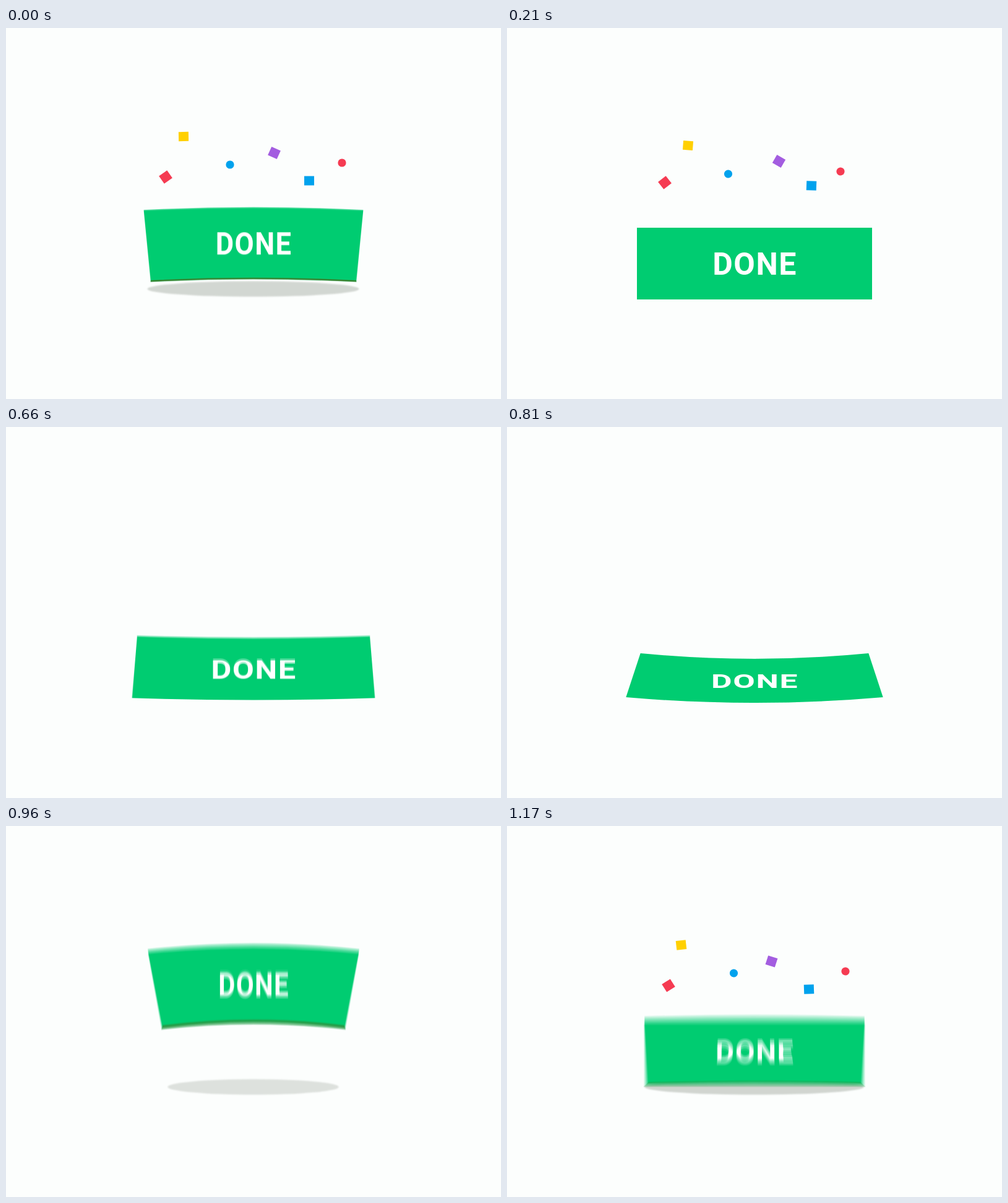
Animation, 800 px wide and 600 px high, one loop 1200 ms. Source, as an HTML page:

```html
<!DOCTYPE html>
<html lang="en">
<head>
<meta charset="utf-8">
<title>Done button</title>
<style>
  html, body { margin: 0; width: 100%; height: 100%; overflow: hidden; background: #fcfefd; }
  svg { display: block; width: 100vw; height: 100vh; }
  text { font: 700 50px Roboto, sans-serif; letter-spacing: 1.6px; text-anchor: middle; }
  .smear { isolation: isolate; }
  .smear > * { mix-blend-mode: plus-lighter; }
</style>
</head>
<body>
<svg id="stage" viewBox="0 0 800 600">
  <ellipse id="shadow" cx="399.5" cy="422" ry="12.5" fill="#20301a" style="filter: blur(1px)"/>
</svg>
<script>
const LOOP = 1200, STEP = 30, SHUTTER = 15, COPIES = 15;
const FLOOR = 439, WIDTH = 380, HEIGHT = 116;
const stage = document.getElementById('stage');
const shadow = document.getElementById('shadow');

// apex time, peak lift, half of the air time
const HOPS = [[985, 117, 121], [1206, 29, 65]];

// time and amount of squash; negative is stretch
const SQUASH = [
  [560, 0], [810, 1], [900, 0.4], [975, -0.25],
  [1050, 0.48], [1120, 1], [1170, 0.25], [1200, 0]
];

// shape, colour, x, y, angle, drift, fall
const CONFETTI = [
  ['rect', '#ffd000', 287, 175.5, -1, 5.5, 14.5],
  ['rect', '#f53b52', 258, 241, -35, -3, 9],
  ['circle', '#00a2ed', 362, 221, 0, -4.5, 15],
  ['rect', '#a35de0', 433.5, 202, 24, 6, 13.5],
  ['rect', '#00a2ed', 490, 247, 0, 2, 8],
  ['circle', '#f53b52', 543, 218, 0, -4, 14]
];

function make(parent, tag, attrs) {
  const el = document.createElementNS('http://www.w3.org/2000/svg', tag);
  set(el, attrs);
  parent.appendChild(el);
  return el;
}

function set(el, attrs) {
  for (const k in attrs) el.setAttribute(k, attrs[k]);
}

// smooth curve through [time, value] keys, flat at turning points
function curve(keys, t) {
  const n = keys.length - 1;
  if (t <= keys[0][0]) return keys[0][1];
  if (t >= keys[n][0]) return keys[n][1];
  const rate = j => (keys[j + 1][1] - keys[j][1]) / (keys[j + 1][0] - keys[j][0]);
  const slope = j => {
    if (j === 0 || j === n) return 0;
    const a = rate(j - 1), b = rate(j);
    return a * b <= 0 ? 0 : 2 * a * b / (a + b);
  };
  let i = 0;
  while (t >= keys[i + 1][0]) i++;
  const [t0, v0] = keys[i], [t1, v1] = keys[i + 1];
  const d = t1 - t0, p = (t - t0) / d;
  return v0 + (v1 - v0) * p * p * (3 - 2 * p)
    + d * p * (1 - p) * ((1 - p) * slope(i) - p * slope(i + 1));
}

function liftAt(t) {
  return Math.max(0, ...HOPS.map(([mid, peak, half]) => peak * (1 - ((t - mid) / half) ** 2)));
}

function pose(t) {
  const lift = liftAt(t), squash = curve(SQUASH, t);
  const lean = lift / (lift + 30);
  const bend = 9 * (squash - lean);
  const bottom = FLOOR - lift - 2 * Math.max(0, squash);
  const width = WIDTH + 12 * squash - 75 * lean;
  return {
    bend, bottom, width, lean,
    top: bottom - HEIGHT + 45 * squash,
    half: [width / 2 - 1.3 * bend, width / 2 + 1.3 * bend]
  };
}

// faint copies add up to an average over the shutter time, then take one colour
function smear(tag, color, attrs) {
  const id = 'tint' + stage.childElementCount;
  const filter = make(stage, 'filter', {
    id, filterUnits: 'userSpaceOnUse', x: 0, y: 0, width: 800, height: 600,
    'color-interpolation-filters': 'sRGB'
  });
  make(filter, 'feFlood', { 'flood-color': color });
  make(filter, 'feComposite', { operator: 'in', in2: 'SourceAlpha' });
  const g = make(stage, 'g', { class: 'smear', filter: `url(#${id})` });
  return Array.from({ length: COPIES }, () => make(g, tag, { opacity: 1 / COPIES, ...attrs }));
}

const boxes = smear('path', '#00cc71', { fill: '#fff' });
const edges = smear('path', '#3d7d2b', { fill: 'none', stroke: '#fff' });
const labels = smear('text', '#ffffff', { fill: '#fff', y: 17.8 });
labels.forEach(el => { el.textContent = 'DONE'; });

const pieces = CONFETTI.map(([tag, fill]) => make(stage, tag, tag === 'rect'
  ? { x: -8, y: -7.5, width: 16, height: 15, fill }
  : { r: 6.6, fill }));

function drawCopy(k, t) {
  const { top, bottom, bend, half, width, lean } = pose(t);
  const [a, b] = half, thick = 4.5 * lean, y = bottom - thick / 2;
  set(boxes[k], {
    d: `M${400 - a} ${top}Q400 ${top + 2 * bend} ${400 + a} ${top}`
      + `L${400 + b} ${bottom}Q400 ${bottom + 2 * bend} ${400 - b} ${bottom}Z`
  });
  set(edges[k], {
    d: `M${400 - b} ${y}Q400 ${y + 2 * bend} ${400 + b} ${y}`,
    'stroke-width': thick
  });
  const mid = (top + bottom) / 2 + bend + 0.4;
  set(labels[k], {
    transform: `translate(400.6 ${mid}) scale(${width / WIDTH} ${(bottom - top) / HEIGHT})`
  });
}

function drawConfetti(t) {
  const on = t >= -60 && t < 420;
  const p = t < 0 ? t / 30 : t / 210;
  const size = 1 - (Math.max(0, t - 225) / 195) ** 2;
  CONFETTI.forEach(([, , x, y, angle, drift, fall], i) => {
    const dy = p < 0 ? 17 * p * p : fall * p ** 1.5;
    pieces[i].style.display = on ? '' : 'none';
    set(pieces[i], {
      transform: `translate(${x + drift * p} ${y + dy}) rotate(${angle + drift * p}) scale(${on ? size : 0})`
    });
  });
}

function draw(ms) {
  const now = Math.floor(ms % LOOP / STEP) * STEP;
  const t = now < 560 ? now + LOOP : now;
  for (let k = 0; k < COPIES; k++) drawCopy(k, t + (k / (COPIES - 1) - 0.5) * SHUTTER);

  // the shadow trails the box a little
  const lift = liftAt(t - 15);
  set(shadow, { rx: 182 - 0.42 * lift, opacity: liftAt(t) > 0 ? 0.2 - 0.0006 * lift : 0 });
  drawConfetti(now > 1100 ? now - LOOP : now);
}

const start = performance.now();
function tick() {
  draw(performance.now() - start);
  requestAnimationFrame(tick);
}
tick();
</script>
</body>
</html>
```
